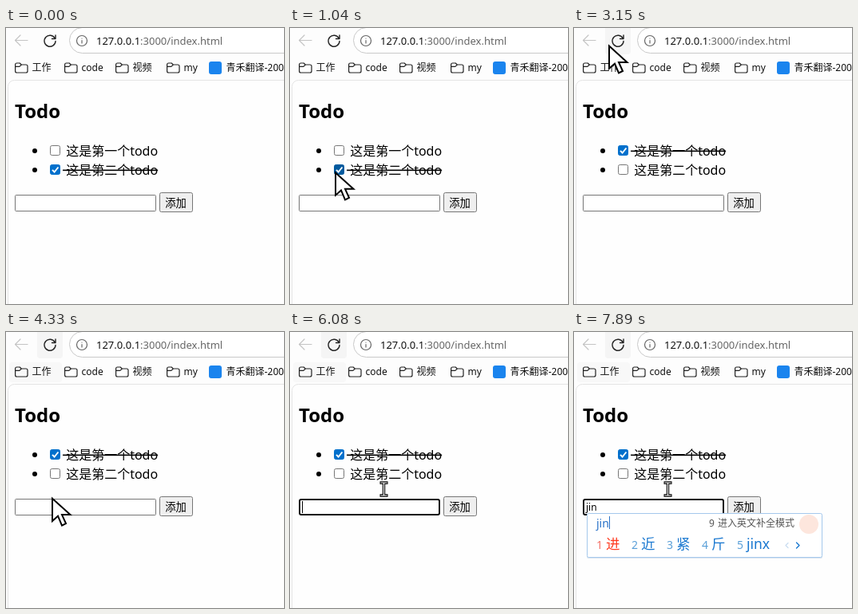
Recreate the animation shown at these times as an HTML page. Size 348 px wide and 346 px high, loop 8 s.

```html
<!DOCTYPE html>
<html lang="zh">
<head>
<meta charset="utf-8">
<style>
html, body { margin: 0; width: 100%; height: 100%; overflow: hidden; background: #fefefe; }
svg { display: block; width: 348px; height: 346px; font-family: 'Noto Sans', 'Noto Sans CJK SC', sans-serif; }
text { white-space: pre; }
.line { fill: none; stroke: #222; stroke-width: 1.2; stroke-linecap: round; stroke-linejoin: round; }
.done { text-decoration: line-through; }
</style>
</head>
<body>
<svg viewBox="0 0 348 346">
  <defs>
    <path id="folder" class="line" d="M11.6 53.5V46q0-2 2-2h3.6l2 2H25q2 0 2 2v6q0 2-2 2H13.6q-2 0-2-2zM11.6 48.4h5.2l2.4-2.2"/>
  </defs>
  <rect width="348" height="346" fill="#fdfdfd"/>
  <path d="M2.5 350V73.5a8 8 0 0 1 8-8H350V350z" fill="#fefefe" stroke="#e4e4e4"/>

  <rect id="hover" x="39" y="-4" width="32" height="37" rx="4" fill="#f5f5f5"/>
  <rect id="markHover" x="4" y="38" width="66" height="25" rx="4" fill="#f8f8f8"/>
  <path class="line" style="stroke:#c4c4c4" d="M27 15.5H11.5M18 9l-6.500 6.500L18 22"/>
  <path id="reload" class="line" style="stroke-width:1.4" d="M61.2 13A7 7 0 1 0 62 16.5M62 9v4.5h-4.5"/>
  <path id="stop" class="line" style="stroke-width:1.4" d="M49 10.5l12 12M61 10.5l-12 12"/>
  <rect x="79.5" y="-.5" width="300" height="32" rx="16" fill="#fff" stroke="#c9c9c9"/>
  <circle cx="95" cy="16" r="6.5" class="line" style="stroke:#666"/>
  <path class="line" style="stroke:#666" d="M95 15.5v3.5M95 13v.1"/>
  <text x="113" y="21" font-size="13" fill="#111">127.0.0.1<tspan fill="#666">:3000/index.html</tspan></text>

  <g id="marks" font-size="12" fill="#111"></g>
  <rect x="254" y="42" width="16" height="16" rx="3" fill="#1a84ee"/>

  <text x="11" y="113" font-size="24" font-weight="700">Todo</text>
  <g id="list" font-size="16"></g>

  <rect id="field" fill="#fff"/>
  <text id="typed" x="15" y="224" font-size="12"></text>
  <rect id="caret" y="212" width="1" height="15"/>
  <rect x="192.5" y="206.5" width="41" height="24" rx="2" fill="#efefef" stroke="#767676"/>
  <text x="199.3" y="224" font-size="13.33">添加</text>

  <g id="ime">
    <rect id="shade" x="16" y="228" height="56" rx="2" fill="#dce6f0"/>
    <rect id="panel" x="16.5" y="227.5" height="55" rx="2" fill="#fff" stroke="#a5c8ec"/>
    <circle id="badge" cy="241" r="12" fill="#fde6dd"/>
    <text id="pinyin" x="28" y="245" font-size="14" fill="#2a72c8"></text>
    <rect id="imeCaret" y="231" width="1" height="16" fill="#2a72c8"/>
    <text id="hint" x="169" y="244" font-size="12" fill="#555">9<tspan x="180">进入英文补全模式</tspan></text>
    <g id="words"></g>
    <path id="prev" class="line" style="stroke:#c9dcf0" d="M2-3l-3 3 3 3"/>
    <path id="next" class="line" style="stroke:#1a78d0;stroke-width:1.4" d="M12.5-3.500l3.500 3.500-3.500 3.500"/>
  </g>

  <path id="arrow" d="M1 2.6V30.8L8 24.6 13 36.5 18 34 13 23H23.500Z" fill="#fff" stroke="#000" stroke-width="2"/>
  <g id="beam" fill="none">
    <path d="M-5-8H5M0-8V8M-5 8H5" stroke="#000" stroke-width="3.4"/>
    <path d="M-4-8H4M0-8V8M-4 8H4" stroke="#fff" stroke-width="1.2"/>
  </g>
</svg>
<script>
const LOOP = 8000;
const $ = id => document.getElementById(id);
const set = (el, attrs) => { for (const k in attrs) el.setAttribute(k, attrs[k]); };
const show = (el, on) => { el.style.display = on ? '' : 'none'; };
const within = (t, a, b) => t >= a && t < b;

$('marks').innerHTML = ['工作', 'code', '视频', 'my'].map((label, i) => {
  const x = [0, 62, 126, 190][i];
  return `<use href="#folder" x="${x}"/><text x="${x + 32.5}" y="54">${label}</text>`;
}).join('') + '<text x="275.5" y="54">青禾翻译-2000</text>';

$('list').innerHTML = ['一', '二'].map((n, i) => `<g transform="translate(0 ${i * 24})">
  <circle cx="36" cy="154" r="3"/>
  <rect class="box" x="55.5" y="147.5" width="12" height="12" rx="2"/>
  <path class="tick" d="M58 153.8l2.6 2.7 4.8-6" fill="none" stroke="#fff" stroke-width="1.9"/>
  <text x="71" y="160"> 这是第${n}个todo</text></g>`).join('');
const rows = [...$('list').children];

// pointer hot spot: time, x, y
const route = [
  [160, 100, 297], [500, 66, 200], [680, 58, 168], [800, 56, 186], [940, 56, 186],
  [1040, 56, 179], [1120, 56, 166], [1260, 56, 166], [1360, 62, 158], [1720, 62, 158],
  [1920, 62, 172], [2890, 62, 172], [3150, 43, 20], [3390, 44, 18], [4030, 44, 18],
  [4330, 57, 206], [4560, 60, 231], [4770, 62.5, 206], [5020, 62.5, 206],
  [5260, 199, 190], [5500, 117.5, 197]
];

function pointer(t) {
  const i = route.findIndex(p => p[0] > t);
  if (i < 0) return route[route.length - 1].slice(1);
  if (i === 0) return [-99, -99];
  const [a, x, y] = route[i - 1], [b, u, v] = route[i], k = (t - a) / (b - a);
  return [x + (u - x) * k, y + (v - y) * k];
}

// time, typed letters, candidates, panel width
const typing = [
  [6910, 'j', ['就', '将', '加', '讲', '+'], 282],
  [7030, 'ji', ['就', '几', '及', '级', '机'], 282],
  [7360, 'jin', ['进', '近', '紧', '斤', 'jinx'], 294]
];
let shown;

function drawIme(entry) {
  if (entry === shown) return;
  shown = entry;
  show($('ime'), entry);
  $('typed').textContent = entry ? entry[1] : '';
  if (!entry) return;
  const [, letters, words, w] = entry;
  set($('shade'), { width: w + 1 });
  set($('panel'), { width: w });
  set($('badge'), { cx: w });
  $('pinyin').textContent = letters;
  set($('imeCaret'), { x: Math.round(28.5 + $('pinyin').getComputedTextLength()) });
  $('words').innerHTML = words.map((word, i) => `
    <text x="${28 + i * 44}" y="271.5" font-size="14" fill="${i ? '#5a9fd8' : '#f5746a'}">${i + 1}</text>
    <text x="${40 + i * 44}" y="272" font-size="17.5" fill="${i ? '#1a78d0' : '#ff3b20'}">${word}</text>`).join('');
  for (const id of ['prev', 'next']) set($(id), { transform: `translate(${w - 28} 267.5)` });
}

function drawRow(i, checked, hover, press) {
  const row = rows[i];
  const ink = checked
    ? (press ? '#3c93d8' : hover ? '#005a9e' : '#0070cc')
    : (press ? '#8d8d8d' : hover ? '#4f4f4f' : '#767676');
  set(row.querySelector('.box'), { stroke: ink, fill: checked ? ink : '#fff' });
  show(row.querySelector('.tick'), checked);
  row.querySelector('text').classList.toggle('done', checked);
}

function draw(t) {
  const [x, y] = pointer(t);
  const over = (l, top, r, b) => x >= l && x <= r && y >= top && y <= b;
  const onField = over(11, 208, 188, 230) || (t > 4600 && x < 190);
  const focus = t >= 5020;

  show($('arrow'), !onField);
  show($('beam'), onField);
  for (const id of ['arrow', 'beam']) set($(id), { transform: `translate(${x} ${y})` });

  show($('hover'), t >= 3070);
  show($('markHover'), t >= 4080);
  const loading = within(t, 3390, 3550);
  show($('reload'), !loading);
  show($('stop'), loading);

  drawRow(0, t >= 1720, over(55, 147, 68, 160), within(t, 1560, 1720));
  drawRow(1, t < 2660, over(55, 171, 68, 184), within(t, 2540, 2660));

  set($('field'), focus
    ? { x: 12, y: 210, width: 175, height: 19, rx: 2, stroke: '#101010', 'stroke-width': 2 }
    : { x: 11.5, y: 209.5, width: 176, height: 20, rx: 1, stroke: onField ? '#4f4f4f' : '#767676', 'stroke-width': 1 });

  drawIme(typing.filter(e => t >= e[0]).pop() || null);
  show($('hint'), t >= 7730);
  show($('caret'), within(t, 5020, 5500) || within(t, 6080, 6580) || within(t, 6910, 7890));
  set($('caret'), { x: Math.floor(15 + $('typed').getComputedTextLength()) });
}

const start = performance.now();
function tick() {
  draw((performance.now() - start) % LOOP);
  requestAnimationFrame(tick);
}
tick();
</script>
</body>
</html>
```
